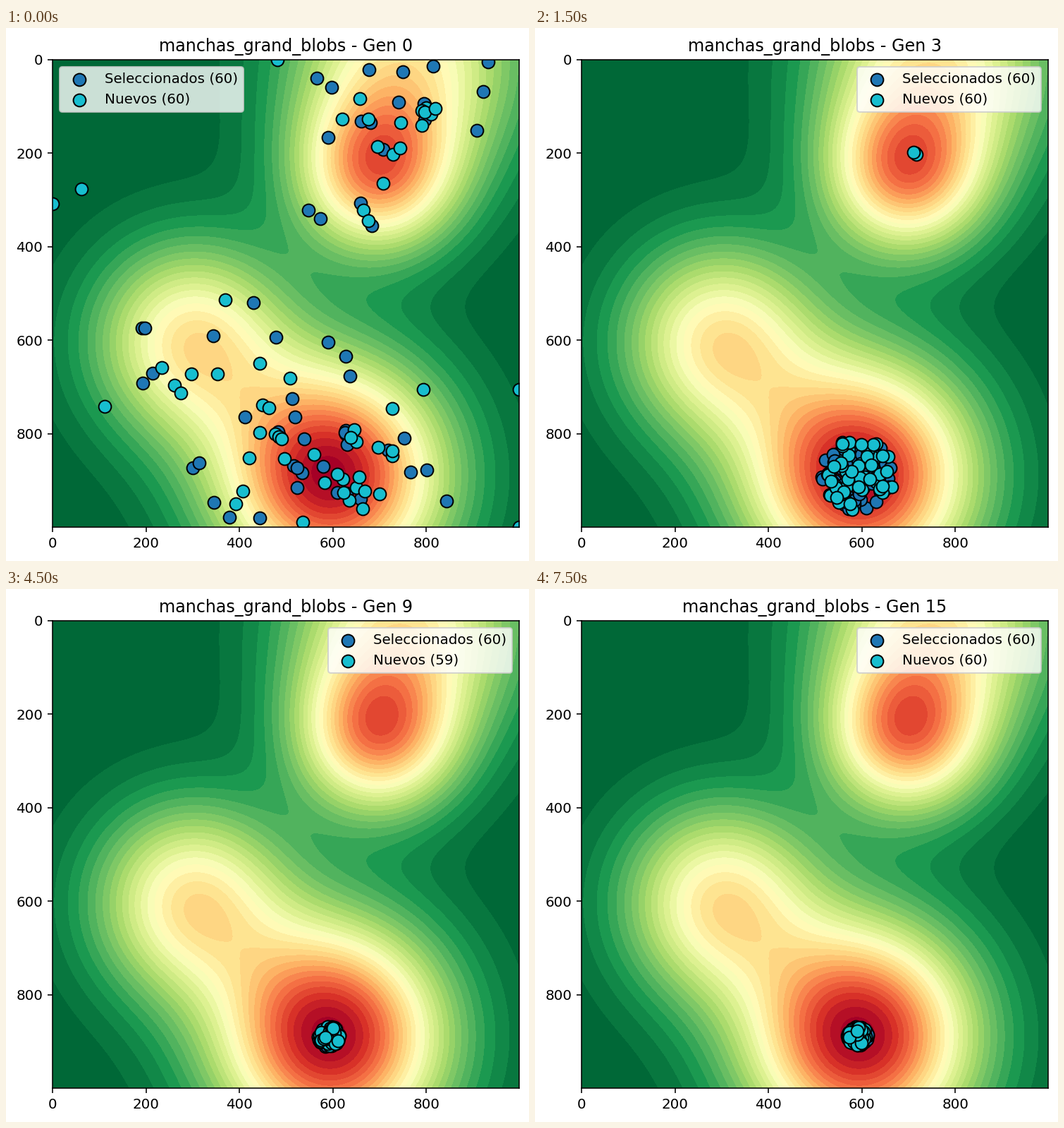
Write a matplotlib script that moves like this. It is 742 px wide and 755 px high and loops after 8 s.

```python
import matplotlib.pyplot as plt
import numpy as np
from matplotlib.animation import FuncAnimation

W, H, DPI = 742, 755, 143.2
GENS, STEP = 16, 500
SIDE, POP, BANDS = 999, 60, 30

# x, y, sigma, height of each hill
HILLS = [
    (595, 888, 165, 0.98),
    (298, 602, 142, 0.565),
    (695, 243, 118, 0.66),
    (760, 0, 170, 0.52),
]
# x, y, spread, members of each family in the early generations
FAMILIES = np.array([
    (800, 105, 11, 11),
    (680, 130, 3, 3),
    (713, 200, 12, 5),
    (374, 663, 14, 2),
    (444, 740, 4, 2),
    (482, 802, 7, 7),
    (640, 805, 9, 6),
    (730, 842, 6, 4),
    (575, 875, 32, 10),
    (660, 937, 20, 10),
])
RUNNER_UP = (713, 200)
# generations in which one new individual is missing
SHORT = (6, 8, 9)


def height(x, y):
    return sum(a * np.exp(-((x - cx) ** 2 + (y - cy) ** 2) / (2 * s * s))
               for cx, cy, s, a in HILLS)


def best(pool):
    return pool[np.argsort(-height(*pool.T))[:POP]]


def explorers(rng, n, floor):
    """Random points that lie above a given height."""
    pool = rng.uniform(0, SIDE, (600, 2))
    return pool[height(*pool.T) > floor][:n]


def strays(rng, n):
    """Wild mutations, many of them held back by the border."""
    return np.clip(rng.uniform(-400, SIDE + 400, (n, 2)), 0, SIDE)


def families(rng, share=1.0):
    members = (FAMILIES[:, 3] * share).astype(int)
    homes = np.repeat(FAMILIES[:, :3], members, axis=0)
    return homes[:, :2] + homes[:, 2:] * rng.normal(0, 1, (len(homes), 2))


def cluster(rng, gen, n):
    """Cloud around the summit that shrinks with each generation."""
    age = gen - 3
    half = np.array([22 + 55 * 0.55 ** age, 20 + 58 * 0.62 ** age])
    angle = rng.uniform(0, 2 * np.pi, n)
    r = np.sqrt(rng.uniform(0, 1, n))
    return (591, 888) + half * np.c_[r * np.cos(angle), r * np.sin(angle)]


def evolve():
    """List of (selected, new) for every generation."""
    rng = np.random.default_rng(7)
    selected = np.vstack([families(rng, 0.35), explorers(rng, 44, 0.28)])
    new = np.vstack([families(rng, 0.5), explorers(rng, 24, 0.45), strays(rng, 8)])
    history = [(selected, new)]

    selected, new = best(np.vstack([selected, new])), families(rng)
    history.append((selected, new))

    selected = best(np.vstack([selected, new]))
    new = best(np.clip(selected + rng.normal(0, 10, selected.shape), 0, SIDE))
    history.append((selected, new))

    for gen in range(3, GENS):
        selected = cluster(rng, gen, POP)
        new = cluster(rng, gen, POP - (gen in SHORT))
        if gen == 3:
            selected[:2] = RUNNER_UP + rng.normal(0, 3, (2, 2))
            new[:2] = RUNNER_UP + rng.normal(0, 3, (2, 2))
        history.append((selected, new))
    return history


HISTORY = evolve()

fig = plt.figure(figsize=((W + 0.01) / DPI, (H + 0.01) / DPI), dpi=DPI,
                 facecolor="white")
ax = fig.add_axes([66.2 / W, 1 - 706.7 / H, 661.8 / W, 661.8 / H])

axis = np.linspace(0, SIDE, 334)
gx, gy = np.meshgrid(axis, axis)
ax.contourf(gx, gy, height(gx, gy), levels=np.linspace(0, 1, BANDS + 1),
            cmap="RdYlGn_r", vmin=0.5 / BANDS, vmax=1 - 0.5 / BANDS)
ax.set(xlim=(0, SIDE), ylim=(SIDE, 0),
       xticks=range(0, 1000, 200), yticks=range(0, 1000, 200))

dot = dict(s=80, edgecolors="black", linewidths=1)
old_dots = ax.scatter([], [], c="tab:blue", **dot)
new_dots = ax.scatter([], [], c="tab:cyan", **dot)
title = ax.set_title("")


def draw(gen):
    selected, new = HISTORY[gen]
    old_dots.set_offsets(selected)
    new_dots.set_offsets(new)
    title.set_text(f"manchas_grand_blobs - Gen {gen}")
    legend = ax.legend(
        [old_dots, new_dots],
        [f"Seleccionados ({POP})", f"Nuevos ({POP - (gen in SHORT)})"],
        loc="upper left" if gen < 2 else "upper right")
    return old_dots, new_dots, title, legend


anim = FuncAnimation(fig, draw, frames=GENS, interval=STEP, repeat=True,
                     repeat_delay=0, blit=False)
plt.show()
```
